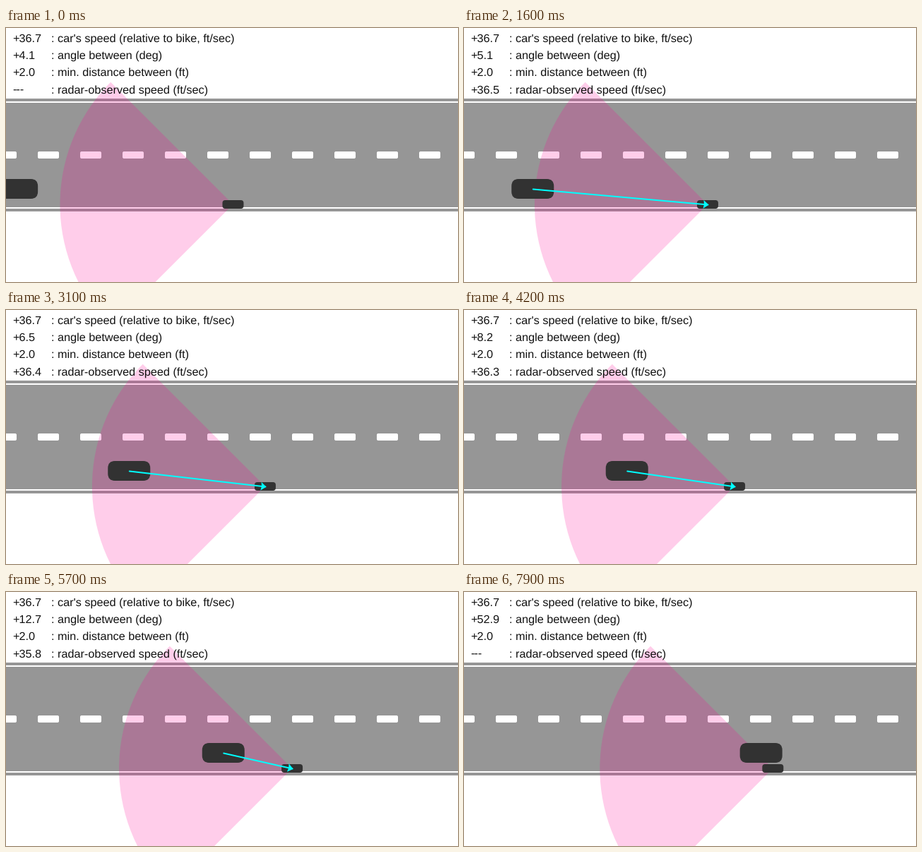
Recreate the animation shown at these times as a matplotlib script. Size 640 px wide and 360 px high, loop 8 s.

```python
import math

import matplotlib.pyplot as plt
from matplotlib.animation import FuncAnimation
from matplotlib.patches import FancyBboxPatch, Polygon, Rectangle, Wedge

W, H, DPI = 640, 360, 100
FRAMES, STEP = 80, 100
PT = 72 / DPI

ROAD, DARK, CYAN, PINK = "#969696", "#323232", "cyan", "#ff0096"
CAR_Y, BIKE_Y = 228, 250
CAR_W, CAR_H, BIKE_W, BIKE_H = 60, 28, 30, 12
BIKE_V = 10 * 5280 / 3600  # ft/sec
CAR_V = 35 * 5280 / 3600
BEAM, HALF_ANGLE = 245, 45
LABELS = [
    "car's speed (relative to bike, ft/sec)",
    "angle between (deg)",
    "min. distance between (ft)",
    "radar-observed speed (ft/sec)",
]

plt.rcParams["font.family"] = "Liberation Sans"
plt.rcParams["text.hinting"] = "none"
fig = plt.figure(figsize=(W / DPI, H / DPI), dpi=DPI, facecolor="white")
ax = fig.add_axes([0, 0, 1, 1])
ax.set(xlim=(0, W), ylim=(H, 0))
ax.axis("off")


def rect(x, y, w, h, color):
    ax.add_patch(Rectangle((x, y), w, h, fc=color, lw=0, zorder=1))


def rounded(x, y, w, h, r, color, z):
    style = f"round,pad=0,rounding_size={r}"
    box = FancyBboxPatch((x, y), w, h, boxstyle=style, fc=color, lw=0, zorder=z)
    return ax.add_patch(box)


def write(x, row, text):
    return ax.text(x, round(19.8 + 24.3 * row), text, size=16.2 * PT,
                   color="#111111", va="baseline", zorder=6)


rect(0, 100, W, 160, ROAD)
for y in (104, 254):
    rect(0, y, W, 2, "white")
for x in range(-15, W, 60):
    rounded(x, 175, 30, 10, 2, "white", 1)

cone = ax.add_patch(Wedge((0, BIKE_Y), BEAM, 180 - HALF_ANGLE, 180 + HALF_ANGLE,
                          fc=PINK, alpha=50 / 255, lw=0, zorder=2))
car = rounded(0, CAR_Y - CAR_H / 2, CAR_W, CAR_H, 10, DARK, 3)
bike = rounded(0, BIKE_Y - BIKE_H / 2, BIKE_W, BIKE_H, 4, DARK, 3)
ray, = ax.plot([], [], color=CYAN, lw=2 * PT, solid_capstyle="round", zorder=4)
head = ax.add_patch(Polygon([(0, 0)] * 4, fc=CYAN, lw=0, zorder=5))

values = [write(9.3, row, "") for row in range(4)]
for row, label in enumerate(LABELS):
    write(64, row, ": " + label)


def arrow_head(x, y, angle):
    c, s = math.cos(angle), math.sin(angle)
    shape = [(1, 0), (-6.5, -6), (-5.5, 0), (-6.5, 6)]
    return [(x + c * u - s * v, y + s * u + c * v) for u, v in shape]


def update(i):
    t = (i + 1) / 10
    car_x, bike_x = 10 + CAR_V * t, 320 + BIKE_V * t
    dx, dy = bike_x - car_x, BIKE_Y - CAR_Y
    angle = math.atan2(dy, dx)
    front = math.hypot(dx - CAR_W / 2, dy)
    seen = front < BEAM and math.degrees(angle) < HALF_ANGLE

    car.set_x(car_x - CAR_W / 2)
    bike.set_x(bike_x - BIKE_W / 2)
    cone.set_center((bike_x, BIKE_Y))
    # strokes sit on pixel centres
    ray.set_data([car_x + 0.5, bike_x + 0.5], [CAR_Y + 0.5, BIKE_Y + 0.5])
    head.set_xy(arrow_head(bike_x + 0.5, BIKE_Y + 0.5, angle))
    ray.set_visible(seen)
    head.set_visible(seen)

    speed = CAR_V - BIKE_V
    gap = dy - (CAR_H + BIKE_H) / 2
    numbers = [speed, math.degrees(angle), gap, speed * math.cos(angle)]
    for text, n in zip(values, numbers):
        text.set_text(f"{n:+.1f}")
    if not seen:
        values[3].set_text("---")
    return [cone, car, bike, ray, head, *values]


anim = FuncAnimation(fig, update, frames=FRAMES, interval=STEP,
                     repeat=True, repeat_delay=0, blit=False)
plt.show()
```
